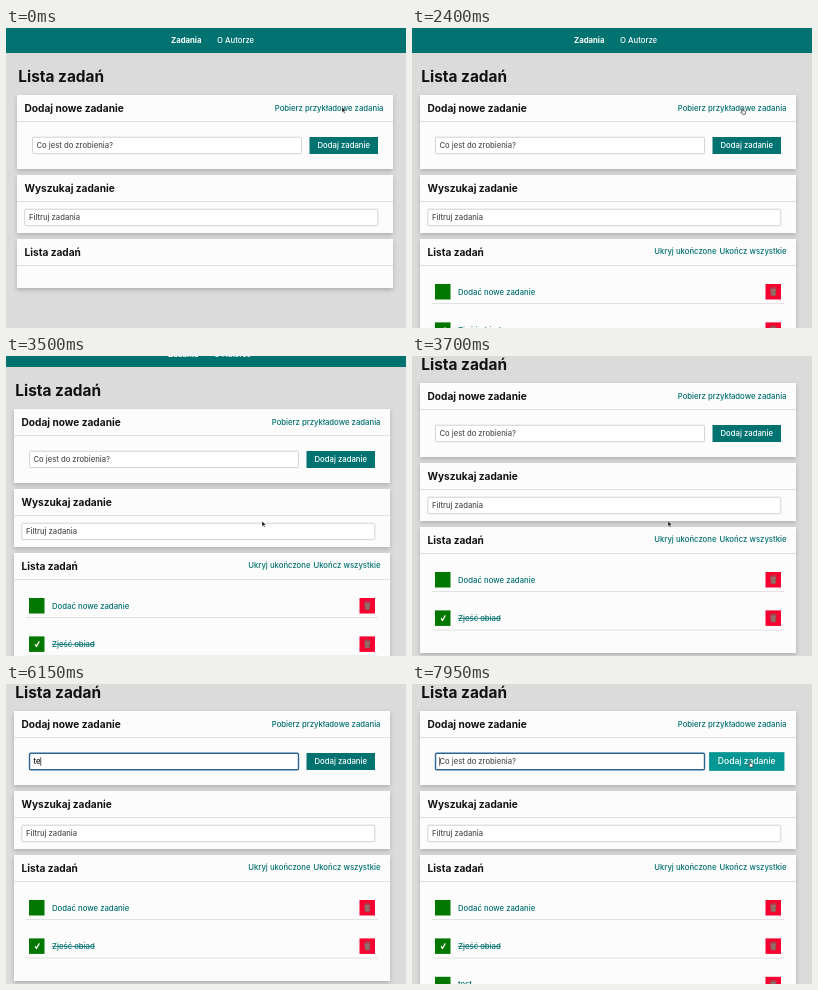
Recreate the animation shown at these times as an HTML page. Size 400 px wide and 300 px high, loop 8000 ms.

```html
<!DOCTYPE html>
<html lang="pl">
<head>
<meta charset="utf-8">
<title>Lista zadań</title>
<style>
html, body { margin: 0; width: 100%; height: 100%; overflow: hidden; background: #dbdbdb; }
svg { display: block; width: 400px; height: 300px; }
text { font: 500 7.75px Inter, "Open Sans", sans-serif; fill: #00706f; }
.h1 { font-size: 15.4px; font-weight: 700; fill: #111; }
.h2 { font-size: 10.15px; font-weight: 700; fill: #111; }
.nav { fill: #fff; }
.bold { font-weight: 700; }
.hint { fill: #505050; font-size: 7.65px; }
.typed { fill: #111; font-size: 7.65px; }
.end { text-anchor: end; }
.mid { text-anchor: middle; }
.card { fill: #fcfcfc; filter: drop-shadow(0 2px 2px rgba(0,0,0,.2)); }
.line { stroke: #d9d9d9; stroke-width: .8; }
.field { fill: #fff; stroke: #c8c8c8; stroke-width: .8; }
.done { text-decoration: line-through; }
</style>
</head>
<body>
<svg id="stage" viewBox="0 0 400 300"></svg>
<script>
const LOOP = 8000, STEP = 50;
const LOADING = 1250, LOADED = 2350, FOCUS = 4900, ADDED = 7500;
const KEYS = [6000, 6150, 6300, 6450];
const WORD = 'test';

// time, value...
const SCROLL = [[3300, 0], [3400, 4], [3500, 14], [3600, 28], [3700, 40]];
const POINTER = [
  [200, 336, 79], [1000, 329.5, 79], [2350, 329.5, 79], [3100, 256, 165],
  [4050, 256, 165], [4800, 170, 77], [6600, 170, 77], [7250, 336, 77]
];
const HOVER = [[7100, 0], [7300, 1]];

const text = (x, y, str, cls = '', id = '') =>
  `<text x="${x}" y="${y}" class="${cls}" id="${id}">${str}</text>`;
const rect = (x, y, w, h, attrs) =>
  `<rect x="${x}" y="${y}" width="${w}" height="${h}" ${attrs}/>`;
const line = (x1, x2, y) => `<path class="line" d="M${x1} ${y}H${x2}"/>`;
const card = (y, h, title, id = '') =>
  rect(11, y, 376, h, `class="card" id="${id}"`) + line(11, 387, y + 26.5) +
  text(18.5, y + 16.8, title, 'h2');
const field = (x, y, w, id = '') => rect(x, y, w, 16.5, `rx="1.2" class="field" id="${id}"`);

function task(n, label, done, id) {
  const y = 256 + n * 38.4;
  return `<g id="${id}">` +
    rect(26, y, 15.5, 15.5, 'fill="#007800"') +
    (done ? `<path d="M32 ${y + 8}l1.5 2 2.8-5" fill="none" stroke="#fff" stroke-width="1.3"/>` : '') +
    text(49, y + 10.6, label, done ? 'done' : '') +
    rect(356.5, y, 15.5, 15.5, 'fill="#f8002f"') +
    `<path d="M361.6 ${y + 5}h5.4l-.7 6.6h-4zM361 ${y + 4}h6.6M363.2 ${y + 3.2}h2.2M363.4 ${y + 6}v4.6M365.2 ${y + 6}v4.6"
      fill="#a0746f" stroke="#85605c" stroke-width=".7"/>` +
    line(23, 375, y + 19.6) + '</g>';
}

document.getElementById('stage').innerHTML =
  rect(0, 0, 400, 300, 'fill="#dbdbdb"') +
  '<g id="page">' +
    rect(-5, -10, 415, 35, 'fill="#007371"') +
    text(165, 15.1, 'Zadania', 'nav bold') +
    text(211, 15.1, 'O Autorze', 'nav') +
    text(12.3, 53.7, 'Lista zadań', 'h1') +
    card(67, 74, 'Dodaj nowe zadanie') +
    text(377.5, 82.7, 'Pobierz przykładowe zadania', 'end', 'load') +
    text(377.5, 82.7, 'Ładowanie...', 'end hint', 'wait') +
    field(26.5, 109.2, 269, 'input') +
    text(30.5, 120, 'Co jest do zrobienia?', 'hint', 'hint') +
    text(30.5, 120, '', 'typed', 'typed') +
    '<path id="caret" d="M0 113.2v8.6" stroke="#111" stroke-width=".7"/>' +
    '<g id="button">' + rect(303.5, 109, 68.5, 17, 'id="face"') +
      text(337.75, 120.1, 'Dodaj zadanie', 'nav mid') + '</g>' +
    card(147, 58, 'Wyszukaj zadanie') +
    field(18.8, 181.2, 353, '') +
    text(23, 192, 'Filtruj zadania', 'hint') +
    card(211, 49, 'Lista zadań', 'list') +
    '<g id="tasks">' +
      text(307.5, 226.1, 'Ukryj ukończone', 'end') +
      text(377.5, 226.1, 'Ukończ wszystkie', 'end') +
      task(0, 'Dodać nowe zadanie', false, 'task0') +
      task(1, 'Zjeść obiad', true, 'task1') +
      task(2, WORD, false, 'task2') +
    '</g>' +
  '</g>' +
  '<g id="pointer" stroke-linejoin="round">' +
    '<path id="arrow" d="M0 0v5.4l1.3-1.1.9 2 .9-.4-.9-1.9h1.7z" fill="#111" stroke="#fff" stroke-width=".4"/>' +
    '<path id="hand" d="M1.3.4q.6-.5 1 .1l.2 2 2 .5q.7.2.6 1l-.5 2.2h-2.6L.2 4.3q0-.6.7-.5l.6.5z" fill="#fff" stroke="#111" stroke-width=".6"/>' +
    '<path id="beam" d="M-1-3h2M0-3v6M-1 3h2" fill="none" stroke="#222" stroke-width=".6"/>' +
  '</g>';

const el = {};
document.querySelectorAll('[id]').forEach(n => { if (n.id) el[n.id] = n; });
const show = (node, on) => node.setAttribute('visibility', on ? 'visible' : 'hidden');
const ease = p => p * p * (3 - 2 * p);

function at(keys, t, curve = p => p) {
  if (t <= keys[0][0]) return keys[0].slice(1);
  for (let i = 1; i < keys.length; i++) {
    const a = keys[i - 1], b = keys[i];
    if (t <= b[0]) {
      const p = curve((t - a[0]) / (b[0] - a[0]));
      return a.slice(1).map((v, k) => v + (b[k + 1] - v) * p);
    }
  }
  return keys[keys.length - 1].slice(1);
}

function drawPointer(t) {
  const [x, y] = at(POINTER, t, ease);
  const onLink = t >= 1000 && t < LOADED + 150;
  const onButton = t > 5000 && x > 298;
  const onInput = t > 4050 && !onButton && x < 293 && y < 86;
  const hidden = t >= KEYS[0] && t < 6600;
  el.pointer.setAttribute('transform', `translate(${x} ${y})`);
  show(el.hand, !hidden && (onLink || onButton));
  show(el.beam, !hidden && onInput);
  show(el.arrow, !hidden && !onLink && !onButton && !onInput);
}

function drawInput(t) {
  const word = t < ADDED ? WORD.slice(0, KEYS.filter(k => t >= k).length) : '';
  const focus = t >= FOCUS;
  if (el.typed.textContent !== word) el.typed.textContent = word;
  show(el.hint, !word);
  el.input.style.stroke = focus ? '#2c6490' : '';
  el.input.style.strokeWidth = focus ? 1.4 : '';
  const since = t - [FOCUS, ...KEYS, ADDED].filter(k => k <= t).pop();
  show(el.caret, focus && since % 1000 < 500);
  const end = word ? el.typed.getComputedTextLength() : 0;
  el.caret.setAttribute('transform', `translate(${30.7 + end} 0)`);
}

function draw(t) {
  const loaded = t >= LOADED, added = t >= ADDED;
  const [scroll] = at(SCROLL, t);
  el.page.setAttribute('transform', `translate(${loaded ? -3 : 0} ${-scroll})`);

  const busy = t >= LOADING && !loaded;
  show(el.wait, busy);
  show(el.load, !busy);
  el.list.setAttribute('height', added ? 164.4 : loaded ? 126 : 49);
  el.tasks.style.display = loaded ? '' : 'none';
  el.task2.style.display = added ? '' : 'none';

  const [h] = at(HOVER, t, ease);
  const mix = (a, b) => Math.round(a + (b - a) * h);
  el.face.setAttribute('fill', `rgb(${mix(0, 6)},${mix(115, 150)},${mix(113, 147)})`);
  el.button.setAttribute('transform',
    `translate(337.75 117.5) scale(${1 + .1 * h}) translate(-337.75 -117.5)`);

  drawInput(t);
  drawPointer(t);
}

const start = performance.now();
function tick(now) {
  const t = Math.max(0, now - start) % LOOP;
  draw(Math.floor(t / STEP) * STEP);
  requestAnimationFrame(tick);
}
draw(0);
requestAnimationFrame(tick);
</script>
</body>
</html>
```
